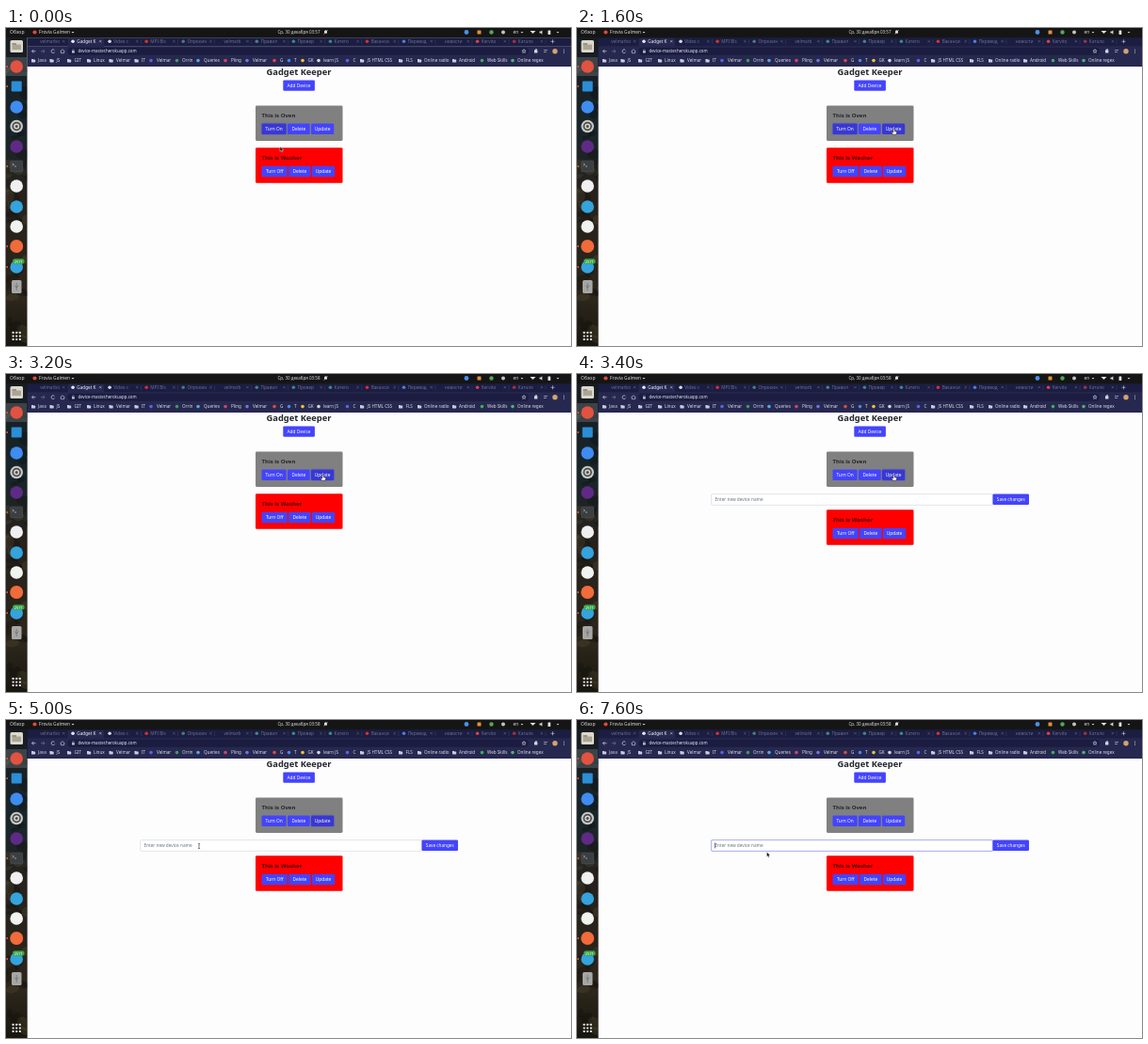
These frames come from a looping animation (600 px wide and 338 px high, 8 s). An HTML page with a canvas:

```html
<!DOCTYPE html>
<html lang="en">
<head>
<meta charset="utf-8">
<title>Gadget Keeper</title>
<style>
  html, body { margin: 0; width: 100%; height: 100%; overflow: hidden; background: #fff; }
  canvas, svg { position: absolute; left: 0; top: 0; width: 600px; height: 338px; }
  text { font-family: "Noto Sans", "Open Sans", sans-serif; white-space: pre; }
</style>
</head>
<body>
<canvas id="stage"></canvas>
<svg id="layer" viewBox="0 0 600 338"><g id="labels"></g><path id="cursor"/></svg>
<script>
const W = 600, H = 338, LOOP = 8000;
const canvas = document.getElementById('stage');
const labels = document.getElementById('labels');
const cursor = document.getElementById('cursor');
const ctx = canvas.getContext('2d');
const dpr = window.devicePixelRatio || 1;
canvas.width = W * dpr;
canvas.height = H * dpr;

const BLUE = [68, 68, 252], DARK = [56, 56, 210];
const BAR = '#26284f', STRIP = '#1b1d42';

const clamp = v => Math.max(0, Math.min(1, v));
const ramp = (t, a, b) => clamp((t - a) / (b - a));
const shade = k => `rgb(${BLUE.map((c, i) => Math.round(c + (DARK[i] - c) * k))})`;

function label(str, x, y, size, fill, opt = {}) {
  const el = document.createElementNS(labels.namespaceURI, 'text');
  const attrs = { x, y, fill, 'font-size': size, 'text-anchor': opt.anchor || 'start', 'font-weight': opt.weight || 400 };
  for (const k in attrs) el.setAttribute(k, attrs[k]);
  el.textContent = str;
  labels.append(el);
  return el;
}

function rect(x, y, w, h, fill) {
  ctx.fillStyle = fill;
  ctx.fillRect(x, y, w, h);
}

function round(x, y, w, h, r, fill, stroke, line = 0.5) {
  ctx.beginPath();
  ctx.roundRect(x, y, w, h, r);
  if (fill) { ctx.fillStyle = fill; ctx.fill(); }
  if (stroke) { ctx.strokeStyle = stroke; ctx.lineWidth = line; ctx.stroke(); }
}

function dot(x, y, r, fill) {
  ctx.fillStyle = fill;
  ctx.beginPath();
  ctx.arc(x, y, r, 0, 7);
  ctx.fill();
}

function line(color, width, ...pts) {
  ctx.strokeStyle = color;
  ctx.lineWidth = width;
  ctx.beginPath();
  pts.forEach(([x, y], i) => i ? ctx.lineTo(x, y) : ctx.moveTo(x, y));
  ctx.stroke();
}

function wedge(x, y, s, fill) {
  ctx.fillStyle = fill;
  ctx.beginPath();
  ctx.moveTo(x - s, y - s / 2);
  ctx.lineTo(x + s, y - s / 2);
  ctx.lineTo(x, y + s / 2);
  ctx.fill();
}

function folder(x, y) {
  round(x - 2, y - 1.7, 2, 1.4, 0.3, '#c9cbdd');
  round(x - 2, y - 1.2, 4.2, 3, 0.4, '#c9cbdd');
}

// [name, icon x, text x, icon colour]; no colour means a folder
const marks = [
  ['Java', 29, 34], ['JS', 48.5, 53.5], ['GIT', 67, 72.5], ['Linux', 88, 93], ['Velmar', 111.5, 117],
  ['IT', 138.5, 144], ['Velmar', 154, 160, '#5a62e8'], ['Orrin', 181.5, 187, '#3f9c5c'],
  ['Queries', 204, 210, '#58a6e0'], ['Pling', 233, 239, '#d0456e'], ['Velmar', 256, 262, '#7076e0'],
  ['G', 285, 291, '#dd4a42'], ['T', 300.5, 306, '#4a86ea'], ['GK', 315, 320.5, '#e9c53c'],
  ['learn JS', 332, 337, '#d8d8d8'], ['C', 362.5, 368.5, '#5a62e8'], ['JS HTML CSS', 378, 383.5],
  ['FLS', 419, 424.5], ['Online radio', 439, 444], ['Android', 476, 481], ['Web Skills', 505.5, 511, '#3fae5a'],
  ['Online regex', 538, 543, '#4cb56b']
];

const tabs = [
  ['velmarbo', ''], ['Gadget K', '#e8e8f0'], ['Video c', '#d8d8e0'], ['MPI Bls', '#d8312c'], ['Опрокин', '#4a7a78'],
  ['velmarb', ''], ['Правил', '#3d8a80'], ['Провер', '#3d8a80'], ['Катего', '#3d8a80'], ['Ваканси', '#d8312c'],
  ['Перевод', '#4a80e0'], ['новости', ''], ['Kervito', '#d8424a'], ['Катало', '#a83038']
];

// launcher tiles: y, colour, radius (negative for a square)
const tiles = [
  [41, '#e25241', 6.8], [62, '#2b8ed6', -5.5], [84, '#3f8cf2', 6.8], [126, '#5f2a86', 6.8],
  [168, '#f0f0f0', 6.8], [190, '#35a3dc', 6.8], [211, '#f1f3f0', 6.8], [232, '#f26b3a', 7], [254, '#35a3dc', 6.8]
];

function drawDock() {
  const g = ctx.createLinearGradient(0, 10, 0, H);
  g.addColorStop(0, '#171c22');
  g.addColorStop(0.3, '#18262a');
  g.addColorStop(0.5, '#26211c');
  g.addColorStop(0.85, '#2c261b');
  g.addColorStop(1, '#17160f');
  rect(0, 10, 22.5, H - 10, g);
  ctx.save();
  ctx.beginPath();
  ctx.rect(0, 10, 22.5, H);
  ctx.clip();
  let seed = 11;
  const rnd = () => (seed = seed * 16807 % 2147483647) / 2147483647;
  for (let i = 0; i < 44; i++) {
    ctx.fillStyle = i % 3 ? 'rgba(0,0,0,.2)' : 'rgba(112,100,62,.2)';
    ctx.beginPath();
    ctx.ellipse(rnd() * 23, 40 + rnd() * 298, 2 + rnd() * 5, 2 + rnd() * 6, rnd() * 3, 0, 7);
    ctx.fill();
  }
  ctx.restore();

  rect(0, 31, 22, 20, 'rgba(255,255,255,.16)');
  round(4.5, 13, 13.5, 13, 1.5, '#dcd8cb');
  round(6.5, 17.5, 9.5, 5.5, 0.6, '#aaa595');
  rect(6.5, 16, 4.5, 2, '#9a9483');

  for (const [y, color, r] of tiles) {
    if (r > 0) dot(11.2, y, r, color);
    else round(11.2 + r, y + r, -2 * r, -2 * r, 1, color);
  }

  dot(11.2, 104.5, 6.8, '#c9c9c7');
  dot(11.2, 104.5, 4.7, '#4b4b4b');
  dot(11.2, 104.5, 3, '#d6d6d4');
  dot(11.2, 104.5, 1.5, '#4b4b4b');

  round(4.8, 141.2, 12.8, 11.6, 1.2, '#3b3f41', '#54585a', 0.6);
  line('#c8c8c8', 0.7, [6.8, 144], [8.4, 145.2], [6.8, 146.4]);
  line('#c8c8c8', 0.7, [9, 147], [11, 147]);

  round(6, 268, 10.5, 14, 1.5, '#a6a7a5');
  line('#666', 0.7, [11.2, 271], [11.2, 279]);
  line('#666', 0.7, [9, 273.5], [11.2, 276], [13.4, 273.5]);

  round(7, 245.2, 12.6, 5.6, 2.7, '#39a84b');
  for (const y of [41, 62, 147, 232, 254]) dot(1.2, y, 0.9, '#e9602c');
  for (let i = 0; i < 9; i++) round(6.6 + i % 3 * 3.6, 322.8 + Math.floor(i / 3) * 3.6, 2, 2, 0.4, '#eee');
}

function drawTopBar() {
  rect(0, 0, W, 10.2, '#151515');
  dot(30.5, 4.5, 2.1, '#dc4b3b');
  wedge(71, 4.7, 1.5, '#ddd');
  // muted bell
  dot(339.5, 3.8, 1.5, '#ddd');
  rect(338, 3.8, 3, 1.8, '#ddd');
  line('#ddd', 0.5, [337.5, 6.7], [341.8, 2]);
  dot(489, 4.5, 2.4, '#4a90f0');
  round(500.5, 2.5, 4, 4, 0.6, '#e2903f');
  dot(515.5, 4.5, 2.2, '#56a65c');
  dot(528, 4.5, 2, '#c4c4c4');
  wedge(548, 4.7, 1.4, '#ddd');
  wedge(559.5, 4.6, 3, '#e2e2e2');
  rect(566.5, 3.6, 1.2, 1.8, '#e2e2e2');
  ctx.fillStyle = '#e2e2e2';
  ctx.beginPath();
  ctx.moveTo(567, 4.5);
  ctx.lineTo(569.4, 2.2);
  ctx.lineTo(569.4, 6.8);
  ctx.fill();
  round(575.5, 2.6, 2.8, 4.3, 0.4, '#e2e2e2');
  wedge(586, 4.7, 1.4, '#ddd');
}

function drawBrowser() {
  rect(22.5, 10.2, W, 9.4, STRIP);
  rect(22.5, 19.4, W, 21.6, BAR);
  round(65.5, 10.8, 38.5, 10, [2, 2, 0, 0], BAR);
  tabs.forEach(([, color], i) => {
    const x = 32 + i * 39.05;
    if (color) dot(x, 14.3, 1.8, color);
    const c = i === 1 ? '#dcdcea' : '#6d6e90';
    line(c, 0.5, [x + 28, 13], [x + 30.4, 15.4]);
    line(c, 0.5, [x + 30.4, 13], [x + 28, 15.4]);
    if (i > 1) line('#4a4b6c', 0.4, [x + 33.4, 12.2], [x + 33.4, 17]);
  });
  line('#d5d6e6', 0.6, [578.5, 14.3], [582.5, 14.3]);
  line('#d5d6e6', 0.6, [580.5, 12.3], [580.5, 16.3]);

  // navigation row
  line('#d5d6e6', 0.7, [31.5, 24.7], [27.5, 24.7]);
  line('#d5d6e6', 0.7, [29.3, 22.9], [27.5, 24.7], [29.3, 26.5]);
  line('#777995', 0.7, [37, 24.7], [41, 24.7]);
  line('#777995', 0.7, [39.2, 22.9], [41, 24.7], [39.2, 26.5]);
  ctx.strokeStyle = '#d5d6e6';
  ctx.beginPath();
  ctx.arc(50, 24.7, 1.9, 0.4, 5.6);
  ctx.stroke();
  line('#d5d6e6', 0.6, [57.5, 24.9], [60, 22.7], [62.5, 24.9]);
  line('#d5d6e6', 0.6, [58.4, 24.4], [58.4, 26.7], [61.6, 26.7], [61.6, 24.4]);
  round(65.5, 20.7, 489.5, 8, 4, '#1b1c40');
  round(70, 24.2, 2.8, 2.2, 0.3, '#c9cadb');
  line('#c9cadb', 0.4, [70.6, 24.2], [70.6, 22.9], [72.2, 22.9], [72.2, 24.2]);
  ctx.strokeStyle = '#d5d6e6';
  ctx.lineWidth = 0.6;
  ctx.beginPath();
  for (let i = 0; i < 10; i++) {
    const r = i % 2 ? 0.9 : 2.2, a = i * Math.PI / 5 - Math.PI / 2;
    ctx.lineTo(550 + r * Math.cos(a), 24.7 + r * Math.sin(a));
  }
  ctx.closePath();
  ctx.stroke();
  round(561, 23.2, 3.4, 3.4, 0.4, '#d5d6e6');
  dot(563, 22.9, 0.8, '#d5d6e6');
  line('#d5d6e6', 0.6, [571, 23.5], [575, 23.5]);
  line('#d5d6e6', 0.6, [571, 25.5], [574, 25.5]);
  dot(583, 24.7, 2.7, '#d3a36f');
  for (const d of [-1.6, 0, 1.6]) dot(592.5, 24.7 + d, 0.5, '#d5d6e6');

  for (const [, x, , color] of marks) color ? dot(x, 34.6, 1.8, color) : folder(x, 34.7);
}

function button(x, y, w, k = 0, ring = 0) {
  if (ring) round(x - 0.5, y - 0.5, w + 1, 12.4, 1.5, null, `rgba(80,80,230,${0.35 * ring})`, 1);
  round(x, y, w, 11.4, 1.2, shade(k));
}

function card(y, color) {
  round(265, y, 92.5, 37.5, 1.3, color);
}

// Static labels
const pale = '#dedede', medium = { weight: 500 }, bold = { weight: 600 };
label('Обзор', 4, 6.3, 5, pale);
label('Frovia Galmen', 35, 6.3, 4.9, pale);
const clock = label('', 288.5, 6.3, 4.5, pale);
label('en', 538.5, 6.2, 4.8, pale);
tabs.forEach(([name], i) => label(name, 36.2 + i * 39.05, 16, 4.7, i === 1 ? '#f0f0f8' : '#6d6e90'));
label('device-master.herokuapp.com', 76.5, 26.3, 4.4, '#e6e6f2', medium);
for (const [name, , x] of marks) label(name, x, 36.3, 4.6, '#dcdcea', medium);
label('2571', 13.3, 249.5, 4, '#fff', { anchor: 'middle' });

const ink = '#212529', mid = { anchor: 'middle', weight: 500 };
label('Gadget Keeper', 311, 50.3, 9.3, ink, { anchor: 'middle', weight: 600 });
label('Add Device', 311, 63, 4.8, '#fff', mid);
label('This is Oven', 271.5, 94.7, 6, ink, bold);
[['Turn On', 284.6], ['Delete', 310.8], ['Update', 336.1]].forEach(([s, x]) => label(s, x, 109, 4.8, '#fff', mid));
const lower = [
  label('This is Washer', 271.5, 139.7, 6, '#4c0404', bold),
  ...[['Turn Off', 285.2], ['Delete', 311.8], ['Update', 337]].map(([s, x]) => label(s, x, 154, 4.8, '#fff', mid))
];
const form = [
  label('Enter new device name', 146.5, 135.1, 4.7, '#6c757d'),
  label('Save changes', 460.8, 135.1, 4.7, '#fff', mid)
];

// Pointer track: time, x, y
const track = [
  [0, 291, 126], [100, 291, 126], [600, 329, 115.5], [900, 336.5, 107.2], [3650, 336.5, 107.2],
  [4400, 207, 134], [4600, 207, 134], [5000, 205, 134], [5250, 205, 134], [5400, 203, 134],
  [6750, 203, 134], [7200, 201.5, 140.3], [LOOP, 201.5, 140.3]
];
const shapes = {
  arrow: ['M0 0V5.2L1.2 4.1L2 5.9L2.9 5.5L2.1 3.8H3.7Z', '#111', '#fff', 0.4],
  hand: ['M-.7 .2Q0 -.6 .7 .2V2.4L2.8 3Q3.3 3.2 3.1 4L2.4 6H-1L-2.5 3.9Q-2.3 3 -1.4 3.4L-.7 4Z', '#fff', '#111', 0.5],
  beam: ['M-1.1 -2.7Q0 -2.7 0 -2.1V2.1Q0 2.7 -1.1 2.7M1.1 -2.7Q0 -2.7 0 -2.1M0 2.1Q0 2.7 1.1 2.7', 'none', '#222', 0.6]
};

function pointer(t) {
  const i = Math.max(1, track.findIndex(p => p[0] > t));
  const [a, b] = [track[i - 1], track[i]];
  const u = ramp(t, a[0], b[0]), k = u * u * (3 - 2 * u);
  return [a[1] + (b[1] - a[1]) * k, a[2] + (b[2] - a[2]) * k];
}

function placeCursor(t, open) {
  const [x, y] = pointer(t);
  const inside = (l, top, r, b) => x > l && x < r && y > top && y < b;
  const kind = inside(324, 101, 348, 113) || inside(299, 101, 323, 113) ? 'hand'
    : open && inside(142, 127, 441, 139.6) ? 'beam' : 'arrow';
  const [d, fill, stroke, width] = shapes[kind];
  cursor.setAttribute('d', d);
  cursor.setAttribute('fill', fill);
  cursor.setAttribute('stroke', stroke);
  cursor.setAttribute('stroke-width', width);
  cursor.setAttribute('transform', `translate(${x} ${y})`);
}

function drawPage(t, open) {
  const shift = open ? 17 : 0;
  const turnOn = 1 - ramp(t, 2800, 2950);
  const update = ramp(t, 740, 890) * (1 - ramp(t, 5250, 5400));
  const focus = ramp(t, 5250, 5400);
  rect(22.5, 41, W, H, '#fdfdfe');
  button(294.3, 55.4, 33.6);
  card(82.4, '#808080');
  button(271.5, 101.6, 26.2, turnOn, turnOn);
  button(299, 101.6, 23.7);
  button(324, 101.6, 24.2, update, update * ramp(t, 2800, 2950));
  card(127.3 + shift, '#ff0000');
  [[271.5, 27.4], [300, 23.6], [325, 24.2]].forEach(([x, w]) => button(x, 146.8 + shift, w));
  if (open) {
    round(142.7, 127.6, 298.8, 11.7, [1.2, 0, 0, 1.2], '#fff', '#ced4da', 0.6);
    if (focus) {
      round(142.4, 127.3, 299.2, 12.3, 1.4, null, `rgba(100,100,252,${0.2 * focus})`, 1.2);
      round(142.7, 127.6, 298.8, 11.7, 1.2, null, `rgba(161,161,253,${focus})`, 0.6);
    }
    button(441.5, 127.5, 38.5);
    // caret blinks with a 600 ms half period
    if (t >= 5250 && Math.floor((t - 5200) / 600) % 2 === 0) rect(146, 130.4, 0.6, 6, '#222');
  }
  lower.forEach(el => el.setAttribute('transform', `translate(0 ${shift})`));
  form.forEach(el => el.setAttribute('visibility', open ? 'visible' : 'hidden'));
}

function frame(now) {
  const t = now % LOOP, open = t >= 3400;
  ctx.setTransform(dpr, 0, 0, dpr, 0, 0);
  drawPage(t, open);
  drawBrowser();
  drawDock();
  drawTopBar();
  clock.textContent = 'Ср, 30 декабря 03:' + (t < 2200 ? 57 : 58);
  placeCursor(t, open);
  requestAnimationFrame(frame);
}
requestAnimationFrame(frame);
</script>
</body>
</html>
```
